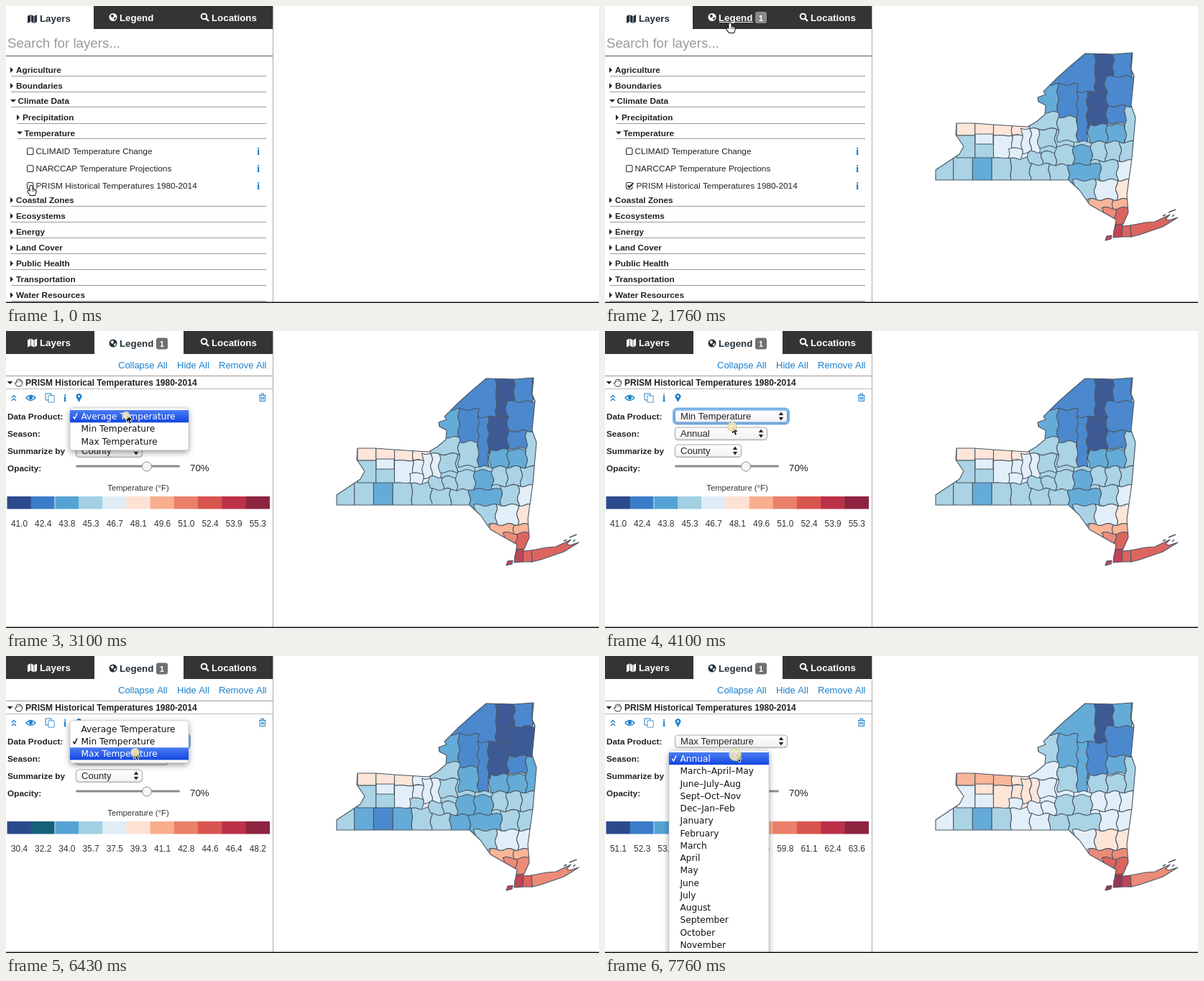
Recreate the animation shown at these times as an HTML page with a canvas. Size 825x413 px, loop 8 s.

```html
<!DOCTYPE html>
<html lang="en">
<head>
<meta charset="utf-8">
<title>Climate map layers</title>
<style>
html, body { margin: 0; width: 100%; height: 100%; overflow: hidden; background: #fff; }
canvas { display: block; }
</style>
</head>
<body>
<canvas id="stage" width="825" height="413"></canvas>
<script>
const c = document.getElementById('stage').getContext('2d');
const LOOP = 8000;
const SANS = '"Liberation Sans", Arial, sans-serif';
const MENU = '"DejaVu Sans", "Lucida Grande", sans-serif';
const BLUE = '#1b7fcb';

// ---------- drawing helpers ----------
function text(s, x, y, size, color = '#222', bold = false, align = 'left', font = SANS) {
  c.font = `${bold ? 'bold ' : ''}${size}px ${font}`;
  c.textAlign = align;
  c.fillStyle = color;
  c.fillText(s, x, y);
}
function rect(x, y, w, h, color) { c.fillStyle = color; c.fillRect(x, y, w, h); }
function rule(x, y, w, color = '#999') { rect(x, y, w, 1, color); }
function line(d, color, width = 1) {
  c.strokeStyle = color;
  c.lineWidth = width;
  c.stroke(new Path2D(d));
}
function fill(d, color) { c.fillStyle = color; c.fill(new Path2D(d)); }
function box(x, y, w, h, r) { c.beginPath(); c.roundRect(x, y, w, h, r); }
function disc(x, y, r, color, edge) {
  c.beginPath();
  c.arc(x, y, r, 0, 7);
  if (color) { c.fillStyle = color; c.fill(); }
  if (edge) { c.strokeStyle = edge; c.stroke(); }
}
function at(x, y, draw) { c.save(); c.translate(x, y); draw(); c.restore(); }
function caret(x, y, open) {
  fill(open ? `M${x} ${y - 2}h8l-4 4z` : `M${x} ${y - 4}v8l4-4z`, '#222');
}
function infoIcon(x, y) { text('i', x, y + 5, 15, BLUE, true, 'center', '"Liberation Serif", Times, serif'); }

// ---------- map ----------
const STATE = new Path2D('M460 242V228L478 216 493 206 499 195 488 179 489 163 513 163 540 165 588 168 600 161 612 151 613 138 ' +
  '603 133 602 127 613 123 610 119 630 99 648 83 668 66 707 67 734 65 732 88 736 97 732 138 738 155 733 212 726 262 728 287 ' +
  '721 303 709 309 711 297 674 276 660 256 645 242Z');

// Bands of counties, each split evenly: [top, bottom, left, right, count]; later bands cover earlier ones.
const bands = [
  [205, 250, 458, 645, 7], [150, 180, 489, 592, 4], [180, 211, 489, 592, 4], [178, 192, 515, 540, 1], [198, 212, 562, 580, 1],
  [170, 204, 580, 604, 2], [203, 220, 589, 627, 2], [171, 196, 603, 651, 2], [194, 221, 627, 677, 2], [220, 256, 645, 689, 1],
  [50, 122, 600, 682, 1], [50, 120, 682, 732, 2], [98, 139, 696, 745, 1], [109, 155, 602, 658, 2], [148, 171, 592, 630, 1],
  [154, 188, 630, 657, 1], [119, 189, 657, 671, 1], [120, 171, 671, 698, 1], [139, 163, 698, 724, 1], [139, 189, 724, 745, 1],
  [165, 189, 673, 724, 2], [189, 215, 677, 737, 3], [215, 242, 689, 737, 2], [242, 269, 652, 742, 3], [269, 290, 672, 742, 2],
  [281, 306, 692, 728, 2]
];

// Borders run straight in the west and wander more towards the east.
function bend(x, y) {
  const sway = Math.min(1.6, Math.max(0, (x - 540) / 30));
  return [x + sway * Math.sin(y * .3 + x * .05), y + sway * Math.sin(x * .27 + y * .04)];
}
function county(x0, y0, x1, y1) {
  const path = new Path2D(), corners = [[x0, y0], [x1, y0], [x1, y1], [x0, y1]];
  corners.forEach(([ax, ay], i) => {
    const [bx, by] = corners[(i + 1) % 4];
    for (let k = 0; k < 1; k += .125) path.lineTo(...bend(ax + (bx - ax) * k, ay + (by - ay) * k));
  });
  path.closePath();
  return { path, x: (x0 + x1) / 2, y: (Math.max(y0, 65) + Math.min(y1, 242 + (x0 > 640) * 70)) / 2 };
}
const counties = bands.flatMap(([top, bottom, left, right, n]) => {
  const w = (right - left) / n;
  return Array.from({ length: n }, (_, i) => county(left + w * i, top, left + w * (i + 1), bottom));
});
const coast = [
  { x: 765, y: 308, path: new Path2D('M731 305 752 301 765 300 786 290 780 296 784 298 797 294 776 307 744 318 732 321Z') },
  { x: 732, y: 300, path: new Path2D('M719 306 731 305 732 321 718 321Z') },
  { x: 714, y: 314, path: new Path2D('M711 304 720 303 719 321 707 322 708 312Z') },
  { x: 712, y: 318, path: new Path2D('M696 326 698 320 705 319 704 324Z') }
];

// Temperature class as a smooth field: warm and cold spots as [strength, x, y, rx, ry].
const spots = [
  [-4, 695, 115, 38, 50],   // high peaks
  [-2, 645, 110, 35, 60],   // northern plateau
  [-1.7, 523, 216, 26, 18], // western hills
  [-2, 655, 232, 22, 28],   // southern mountains
  [2, 535, 168, 75, 22],    // lake plain
  [.7, 572, 195, 30, 14],   // inner lakes
  [6, 728, 322, 80, 55]     // city
];
const SEA = [1, 768, 308, 25, 20];
const spot = ([k, cx, cy, rx, ry], x, y) => k * Math.exp(-(((x - cx) / rx) ** 2) - ((y - cy) / ry) ** 2);
function heat(x, y, p) {
  const v = spots.reduce((sum, s) => sum + spot(s, x, y), 3.2) + p.shift - p.breeze * spot(SEA, x, y);
  return Math.max(0, Math.min(10, Math.round(v)));
}

const ramp = ['#2b4a8b', '#3a7cc8', '#55a3d4', '#a2cfe2', '#e0edf7', '#fde2d4', '#f9ae8e', '#ea8069', '#d8554f', '#bb3148', '#8e2340'];
const products = [
  { name: 'Average Temperature', low: 40.985, step: 1.43, shift: 0, breeze: 0, ramp },
  { name: 'Min Temperature', low: 30.4, step: 1.777, shift: -.3, breeze: 0, ramp: { ...ramp, 1: '#17607a' } },
  { name: 'Max Temperature', low: 51.06, step: 1.255, shift: .7, breeze: 1.2, ramp }
];

function drawMap(p) {
  c.strokeStyle = '#4a5865';
  c.lineWidth = 1.1;
  c.lineJoin = 'round';
  const paint = ({ x, y, path }) => {
    c.fillStyle = `color-mix(in srgb, ${ramp[heat(x, y, p)]} 91%, white)`;
    c.fill(path);
    c.stroke(path);
  };
  c.save();
  c.clip(STATE);
  paint({ x: 600, y: 230, path: STATE });
  counties.forEach(paint);
  c.restore();
  c.stroke(STATE);
  coast.forEach(paint);
  line('M784 287 794 283M776 292 780 290M789 293 792 290', '#4a5865', 1.5);
}

// ---------- tabs ----------
function tabs(s) {
  rect(0, 0, 371, 32, '#323436');
  const active = s.tab === 'layers' ? 0 : 1;
  if (active) rect(123, 0, 124, 33, '#fff'); else rect(0, 0, 122, 33, '#fff');
  const ink = i => i === active ? '#26313a' : '#fff';
  const drop = i => i === active ? 1.5 : 0;

  at(30, 10.5 + drop(0), () => {
    fill('M0 2 4 0V10L0 12ZM4.8 0 8.6 2V12L4.8 10ZM9.4 2 13 0V10L9.4 12Z', ink(0));
  });
  text('Layers', 47, 20.5 + drop(0), 13.3, ink(0), true);

  at(149, 15.5 + drop(1), () => {
    disc(0, 0, 5.5, ink(1));
    fill('M-3.5-2.5 0-4 1-1-1 1-2 .5ZM1 1 4 0 3.5 3 1.5 4Z', active ? '#fff' : '#333');
  });
  text('Legend', 158, 20.5 + drop(1), 13.3, ink(1), true);
  if (s.hover) rule(159, 22 + drop(1), 47, ink(1));
  if (s.badge) {
    box(209, 8 + drop(1), 16, 16, 3);
    c.fillStyle = s.hover && !active ? '#8a8a8a' : '#707070';
    c.fill();
    text('1', 217, 20.5 + drop(1), 11.5, '#fff', true, 'center');
  }

  c.lineWidth = 2;
  disc(275.5, 14.5, 3.8, null, '#fff');
  line('M278.5 17.5 282 21', '#fff', 2.4);
  text('Locations', 286, 20.5, 13.3, '#fff', true);
}

// ---------- layer tree ----------
function checkbox(y, on) {
  box(29.5, y - 4.5, 8.5, 9, 2);
  c.lineWidth = 1.1;
  c.strokeStyle = '#333';
  c.stroke();
  if (on) {
    const tick = `M31.5 ${y - .5} 34 ${y + 2} 39.5 ${y - 4}`;
    line(tick, '#fff', 4);
    line(tick, '#222', 2);
  }
}
function layers(s) {
  text('Search for layers...', 2, 58, 18.7, '#999');
  rule(0, 69, 371, '#555');
  const row = (name, y, x = 6, open = false) => {
    caret(x, y, open);
    text(name, x + (open ? 10.5 : 8), y + 4.3, 11.8, '#222', true);
    rule(x + 1, Math.round(y + 7.5), 361 - x);
  };
  row('Agriculture', 89);
  row('Boundaries', 111);
  row('Climate Data', 132, 6, true);
  row('Precipitation', 155, 15);
  row('Temperature', 176.5, 15, true);
  ['CLIMAID Temperature Change', 'NARCCAP Temperature Projections', 'PRISM Historical Temperatures 1980-2014'].forEach((name, i) => {
    const y = 202 + 24 * i, last = i === 2;
    checkbox(y, last && s.checked);
    text(name, last && s.badge ? 43.5 : 41.5, y + 4, 11.8);
    infoIcon(351, y);
  });
  ['Coastal Zones', 'Ecosystems', 'Energy', 'Land Cover', 'Public Health', 'Transportation', 'Water Resources']
    .forEach((name, i) => row(name, Math.round(270 + 21.95 * i)));
}

// ---------- legend ----------
function select(label, y, w, focus) {
  c.save();
  if (focus) {
    box(95.5, y - 10.5, w + 3, 21, 5);
    c.strokeStyle = '#78b0ea';
    c.lineWidth = 3;
    c.stroke();
  }
  c.shadowColor = 'rgba(0,0,0,.25)';
  c.shadowBlur = 2;
  c.shadowOffsetY = 1;
  const g = c.createLinearGradient(0, y - 9, 0, y + 9);
  g.addColorStop(0, '#fff');
  g.addColorStop(1, '#f1f1f1');
  c.fillStyle = g;
  box(97.5, y - 8.5, w - 1, 17, 4);
  c.fill();
  c.restore();
  c.strokeStyle = focus ? '#5c9be0' : '#aaa';
  c.lineWidth = 1;
  c.stroke();
  text(label, 105, y + 4.5, 13.1, '#222');
  const x = 97 + w - 9;
  fill(`M${x - 3.2} ${y - 1.5}h6.4l-3.2-4.5zM${x - 3.2} ${y + 1.5}h6.4l-3.2 4.5z`, '#222');
}
function menu(items, top, w, checked, lit) {
  const h = items.length * 17.25 + 7;
  c.save();
  c.shadowColor = 'rgba(0,0,0,.4)';
  c.shadowBlur = 9;
  c.shadowOffsetY = 3;
  box(89, top, w, h, 4);
  c.fillStyle = '#fff';
  c.fill();
  c.restore();
  c.strokeStyle = '#c4c4c4';
  c.lineWidth = .7;
  c.stroke();
  items.forEach((name, i) => {
    const y = top + 3 + 17.25 * i, on = i === lit;
    if (on) {
      const g = c.createLinearGradient(0, y, 0, y + 17);
      g.addColorStop(0, '#4a7df3');
      g.addColorStop(1, '#1346e0');
      rect(89, y, w, 17.25, g);
    }
    const ink = on ? '#fff' : '#111';
    if (i === checked) line(`M93.5 ${y + 9} 95.5 ${y + 12} 99 ${y + 4.5}`, ink, 1.5);
    text(name, 104.5, y + 13, 12.2, ink, false, 'left', MENU);
  });
}
function toolIcons() {
  line('M8 92.5 11 89.5 14 92.5M8 97 11 94 14 97', BLUE, 1.3);
  line('M28 93Q34.5 86 41 93Q34.5 100 28 93Z', BLUE, 1.3);
  disc(34.5, 92.5, 2.6, BLUE);
  line('M55 87h8v9h-8zM59 90h8v9h-8z', BLUE);
  rect(59.5, 90.5, 7, 8, '#fff');
  infoIcon(82, 92.5);
  fill('M101.5 99 98.500 93.5A3.9 3.9 0 1 1 104.500 93.5Z', BLUE);
  disc(101.5, 91, 1.4, '#fff');
  line('M352 89.5h9.5M355 89v-2h3.5v2M353 90v7.500h7.500V90M355.2 91.5v4M356.8 91.5v4M358.4 91.5v4', BLUE);
}
function legend(s) {
  text('Collapse All', 156, 52, 13, BLUE);
  text('Hide All', 238, 52, 13, BLUE);
  text('Remove All', 296, 52, 13, BLUE);
  rule(0, 62, 371, '#999');
  caret(1.5, 72, true);
  at(17.5, 72, () => {
    line('M-2 5Q-5 2-5 0L-3 0V-3.5Q-2-5-1-4Q0-6 1.5-4.5Q3-5 3.5-3Q5-3 5-1V1L3 5Z', '#333');
    line('M-1-3.5V-1M1.5-4V-1M3.5-3V-1', '#333', .7);
  });
  text('PRISM Historical Temperatures 1980-2014', 27, 76, 12, '#222', true);
  rule(0, 80, 371, '#bbb');
  toolIcons();

  ['Data Product:', 'Season:', 'Summarize by', 'Opacity:'].forEach((name, i) => text(name, 2, 123 + 24 * i, 11.8, '#222', true));
  select(products[s.pick].name, 118.5, 157, s.focus);
  select('Annual', 142.5, 129);
  select('County', 166.5, 93);
  box(97, 186.5, 145, 3, 1.5);
  c.fillStyle = '#8b8b8b';
  c.fill();
  c.lineWidth = 1;
  disc(196, 188.5, 6.5, '#f7f7f7', '#8c8c8c');
  text('70%', 256, 195, 13.3);

  const p = products[s.map], w = 365 / 11;
  text('Temperature (°F)', 184, 221.5, 11.3, '#333', false, 'center');
  for (let i = 0; i < 11; i++) {
    rect(1.5 + w * i, 230, w + .5, 17.5, p.ramp[i]);
    text((p.low + p.step * i).toFixed(1), 18.5 + w * i, 271.5, 11.9, '#333', false, 'center');
  }
  rect(67.5, 230, 1, 17.5, '#dde7f0');

  if (s.menu === 'product') menu(products.map(q => q.name), 107 - 17.25 * s.pick, 165, s.pick, s.lit);
  if (s.menu === 'season') menu(seasons, 131, 139, 0, 0);
}
const seasons = ['Annual', 'March–April–May', 'June–July–Aug', 'Sept–Oct–Nov', 'Dec–Jan–Feb', 'January', 'February', 'March',
  'April', 'May', 'June', 'July', 'August', 'September', 'October', 'November', 'December'];

// ---------- pointer ----------
function pointer(s) {
  at(...s.at, () => {
    const d = s.hand
      ? 'M-1.5 8V1Q-1.5-.3 0-.3T1.5 1V4.5L5.5 5.5Q7 6 6.8 8L6 11 5 13H-1L-4.3 9Q-5 7.5-3.7 7T-1.5 8Z'
      : 'M0 0V10.5L2.4 8.3 4.2 12.5 6 11.7 4.2 7.7H7.5Z';
    line(d, s.hand ? '#111' : '#fff', s.hand ? 2 : 1.6);
    fill(d, s.hand ? '#fff' : '#111');
    if (s.hand) line('M1.5 5V8M3.5 5.5V8M5.2 6V8', '#111', .7);
  });
  if (s.ring) {
    c.lineWidth = 1.5;
    disc(...s.ringAt, s.ring - 1, 'rgba(250,244,214,.8)', '#d9cf9a');
    if (s.ring > 6) disc(...s.ringAt, s.ring - 4, null, '#eadf9c');
  }
}

// ---------- timeline: each step changes part of the state ----------
const start = { tab: 'layers', map: -1, pick: 0, badge: false, checked: false, hover: false, focus: false, menu: '', lit: 0,
  hand: true, at: [35, 250], ring: 0, ringAt: [34.5, 250] };
const steps = [
  [100, { ring: 5.5 }],
  [430, { ring: 9, badge: true, checked: true, map: 0 }],
  [760, { ring: 0 }],
  [1100, { at: [62, 215.5] }],
  [1430, { at: [180, 20], hover: true }],
  [1760, { at: [174, 24] }],
  [2090, { tab: 'legend', ring: 8, ringAt: [174, 24] }],
  [2430, { ring: 0 }],
  [2760, { hover: false, hand: false, at: [168, 116] }],
  [3100, { menu: 'product', lit: 0, ring: 5.5, ringAt: [167, 117] }],
  [3430, { ring: 0, at: [172, 122] }],
  [3760, { lit: 1, at: [177, 132] }],
  [4100, { menu: '', pick: 1, focus: true, ring: 7, ringAt: [177, 133] }],
  [4430, { map: 1, ring: 0 }],
  [4760, { at: [177, 121] }],
  [5760, { menu: 'product', lit: 1 }],
  [6090, { lit: 2, at: [178, 132] }],
  [6430, { ring: 6.5, ringAt: [179.5, 134] }],
  [6760, { menu: '', pick: 2, map: 2, ring: 0 }],
  [7090, { at: [182.5, 135] }],
  [7430, { menu: 'season', focus: false }],
  [7760, { ring: 9, ringAt: [181, 137] }]
];
const stateAt = t => Object.assign({}, start, ...steps.filter(([from]) => t >= from).map(([, change]) => change));

function draw(t) {
  const s = stateAt(t);
  rect(0, 0, 825, 413, '#fff');
  if (s.map >= 0) drawMap(products[s.map]);
  tabs(s);
  rect(371, 0, 1, 412, '#aaa');
  (s.tab === 'layers' ? layers : legend)(s);
  pointer(s);
  rect(0, 411.5, 825, 1.5, '#111');
}

const begin = performance.now();
function frame() {
  draw((performance.now() - begin) % LOOP);
  requestAnimationFrame(frame);
}
frame();
</script>
</body>
</html>
```
